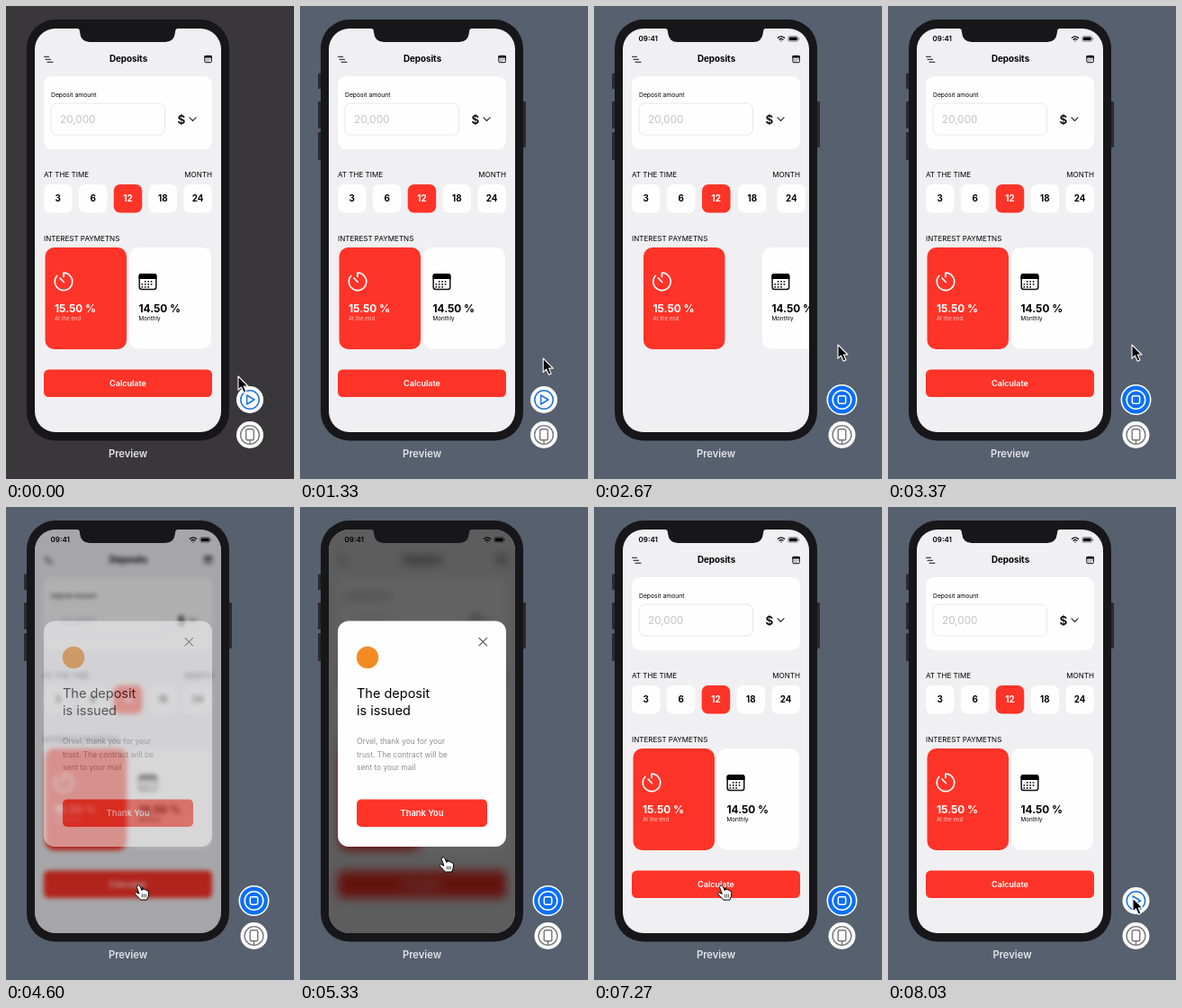
An HTML page for the animation above (8.06 s loop, 320 px wide and 525 px high).

```html
<!DOCTYPE html>
<html lang="en">
<head>
<meta charset="utf-8">
<title>Deposits preview</title>
<style>
  html, body { margin: 0; width: 100%; height: 100%; overflow: hidden; background: #393739; }
  svg { display: block; width: 320px; height: 525px; font-family: Inter, "Liberation Sans", sans-serif; }
  .line { fill: none; stroke-linecap: round; stroke-linejoin: round; }
  .mid { text-anchor: middle; }
  .semi { font-weight: 600; }
  .bold { font-weight: 700; }
</style>
</head>
<body>
<svg viewBox="0 0 320 525">
  <defs>
    <clipPath id="screenClip"><rect x="32" y="25" width="207" height="448" rx="23"/></clipPath>
  </defs>
  <rect id="bg" width="320" height="525"/>

  <g id="sideButtons" fill="#292b31">
    <rect x="20" y="74.5" width="5" height="17.5" rx="1"/>
    <rect x="20" y="106" width="5" height="30" rx="1"/>
    <rect x="20" y="140" width="5" height="31" rx="1"/>
    <rect x="246" y="106" width="5" height="51" rx="1"/>
  </g>
  <rect x="23" y="15" width="225" height="467.5" rx="32" fill="#171619"/>

  <g clip-path="url(#screenClip)">
    <rect x="32" y="25" width="207" height="448" fill="#f0eff2"/>
    <g id="content">
      <g id="header">
        <path class="line" stroke="#111" stroke-width="1.1" d="M42.5 56.3h5M44 59.3h5.5M46 62.3h6"/>
        <text class="mid bold" x="136" y="62" font-size="9.8">Deposits</text>
        <rect x="220.8" y="55.3" width="7.6" height="7.4" rx="1.4" fill="none" stroke="#111"/>
        <path d="M220.5 55h8.2v2.6h-8.2z"/>
        <path stroke="#333" stroke-width=".9" stroke-dasharray="1 1" d="M222.3 59.2h5M222.3 61h4"/>
      </g>
      <g id="amount">
        <rect x="42" y="78" width="187" height="81" rx="9" fill="#fefeff"/>
        <text x="50" y="101" font-size="6.8">Deposit amount</text>
        <rect x="50" y="108" width="126.5" height="35" rx="6.5" fill="#fefeff" stroke="#e7e6ea"/>
        <text x="60" y="130" font-size="11.7" fill="#c3c2c7">20,000</text>
        <text x="190.5" y="130.7" font-size="13.5" class="semi">$</text>
        <path class="line" stroke="#222" stroke-width="1.2" d="M204 123.8l3.5 3.6 3.5-3.6"/>
      </g>
      <g id="timeLabels" font-size="8.05">
        <text x="42" y="190.2">AT THE TIME</text>
        <text x="229" y="190.2" text-anchor="end">MONTH</text>
      </g>
      <g id="tiles"></g>
      <text id="interest" x="42" y="260.5" font-size="8.05">INTEREST PAYMETNS</text>
      <g id="cardEnd">
        <rect x="43.5" y="268" width="90.5" height="113" rx="10" fill="#ff3428"/>
        <g class="line" stroke="#fff" stroke-width="1.7">
          <path d="M64 300.5v-4.3A9.7 9.7 0 1 1 56.7 299.5"/>
          <path d="M60 302l4.3 4.5"/>
        </g>
        <text x="54" y="340" font-size="11.8" class="bold" fill="#fff">15.50 %</text>
        <text x="54" y="348.7" font-size="6" fill="#ffc5c0">At the end</text>
      </g>
      <g id="cardMonth">
        <rect x="137" y="268" width="91" height="112.5" rx="10" fill="#fefeff"/>
        <rect x="148.2" y="297.7" width="18.6" height="16.8" rx="2.5" fill="none" stroke="#111" stroke-width="1.5"/>
        <path d="M147.5 303v-3.2q0-2.8 2.8-2.8h14.4q2.8 0 2.8 2.8v3.2z"/>
        <path stroke="#222" stroke-width="1.6" stroke-dasharray="1.7 1.7" d="M153.9 305.9h10M150.5 308.9h13.5M150.5 311.9h10"/>
        <text x="147.5" y="340" font-size="11.8" class="bold">14.50 %</text>
        <text x="147.5" y="348.7" font-size="6.3">Monthly</text>
      </g>
      <g id="calculate">
        <rect x="42" y="403.5" width="187" height="30.5" rx="5.5" fill="#ff3428"/>
        <text class="mid semi" x="135.5" y="422" font-size="9" fill="#fff">Calculate</text>
      </g>
    </g>

    <rect id="dim" x="32" y="25" width="207" height="448"/>
    <g id="modal">
      <rect x="42" y="126.5" width="187" height="250.5" rx="12" fill="#fefeff"/>
      <path class="line" stroke="#555" stroke-width="1.2" d="M199 145.3l8.6 8.6M207.6 145.3l-8.6 8.6"/>
      <circle cx="75" cy="167" r="12.2" fill="#f48b22"/>
      <g font-size="14.5">
        <text x="63" y="211.5">The deposit</text>
        <text x="63" y="230.5">is issued</text>
      </g>
      <g font-size="8.4" fill="#8d8c91">
        <text x="63" y="263">Orvel, thank you for your</text>
        <text x="63" y="277.7">trust. The contract will be</text>
        <text x="63" y="292.4">sent to your mail</text>
      </g>
      <rect x="63" y="324.5" width="145" height="30.5" rx="5" fill="#ff3428"/>
      <text class="mid semi" x="135.5" y="343.3" font-size="9.4" fill="#fff">Thank You</text>
    </g>
    <g id="status">
      <text x="49.5" y="39.3" font-size="8" class="semi">09:41</text>
      <g class="line" stroke="#000" stroke-width="1.3">
        <path d="M204.4 35.3q3.6-3 7.2 0M206 37.2q2-1.5 4 0"/>
        <path d="M208 38.8v.1"/>
      </g>
      <rect x="215.7" y="33.5" width="11" height="5.8" rx="1.7" fill="none" stroke="#000" stroke-opacity=".5" stroke-width=".7"/>
      <rect x="216.7" y="34.5" width="9" height="3.8" rx=".9"/>
      <path d="M227.7 35.3v2.2" stroke="#000" stroke-opacity=".5"/>
    </g>
  </g>
  <path d="M79 24v1q3 0 3 4q1 11 11 11h84q10 0 11-11q0-4 3-4v-1z" fill="#171619"/>

  <text id="label" class="mid semi" y="501" font-size="11.2" fill="#e4e5e9">Preview</text>

  <g id="dock">
    <g id="play">
      <circle cy="437" r="15" fill="#fff"/>
      <g class="line" stroke="#1c72e4" stroke-width="1.5">
        <circle cy="437" r="10.2"/>
        <path d="M-3.3 432v10l8.2-5z"/>
      </g>
    </g>
    <g id="stop">
      <circle cy="437" r="17" fill="#fff"/>
      <circle cy="437" r="15.4" fill="#0b6ffa"/>
      <g fill="none" stroke="#fff" stroke-width="1.6">
        <circle cy="437" r="10.3"/>
        <rect x="-4.2" y="432.8" width="8.4" height="8.4" rx="1.6"/>
      </g>
    </g>
    <circle cy="476" r="15" fill="#fff"/>
    <g class="line" stroke="#77777c" stroke-width="1.4">
      <circle cy="476" r="10.4"/>
      <rect x="-4.3" y="469.8" width="8.6" height="12" rx="1.4"/>
      <path d="M0 482v4"/>
    </g>
  </g>

  <g id="cursor" stroke-linejoin="round">
    <path id="arrow" fill="#000" stroke="#fff" stroke-width="1.1"
      d="M0 0V15.2L3.5 12L6.2 18.2L9 17L6.3 11H11Z"/>
    <g id="hand">
      <path fill="#fff" stroke="#000" stroke-width="1"
        d="M-1 0.4Q.8-1 1.8.8L4 5.6Q5-.2+5 4.3Q7 3.4 7.4 5Q9.4 4.2 9.8 6Q11.6 5.6 11.6 8L11 12.5L9.5 16H2.5L-3 10.2Q-4.5 8.2-2.7 7.5L1 9.2L-1.6 2.4Q-2 1-1 .4Z"/>
      <path d="M4.3 9.5v4M6.3 9.5v4M8.3 9.5v4" stroke="#000" stroke-width=".7"/>
    </g>
  </g>
</svg>

<script>
const LOOP = 8060, LIVE = 1350, STOPPED = 8000;
const el = {};
document.querySelectorAll('[id]').forEach(n => el[n.id] = n);

el.tiles.innerHTML = [3, 6, 12, 18, 24].map((months, i) => {
  const x = 42 + i * 38.85, on = months === 12;
  return `<g><rect x="${x}" y="198" width="31.5" height="31.5" rx="7" fill="${on ? '#ff3428' : '#fefeff'}"/>
    <text class="mid bold" x="${x + 15.75}" y="217.4" font-size="9.8" fill="${on ? '#fff' : '#000'}">${months}</text></g>`;
}).join('');
const tiles = [...el.tiles.children];
const tileStarts = [1710, 1858, 1980, 2110, 2240];

// time, x, y of the pointer tip
const path = [
  [0, 258, 411], [40, 258, 411], [380, 268, 433], [1000, 268, 433], [1500, 271, 376],
  [3380, 271, 376], [4050, 147, 420], [5070, 147, 420], [5330, 159, 389],
  [5800, 137, 343], [6800, 137, 343], [7000, 137, 420], [7250, 137, 420],
  [7430, 252, 424], [7560, 252, 424], [7700, 272, 434], [LOOP, 272, 434]
];

const clamp = v => Math.min(1, Math.max(0, v));
const ease = v => v * v * (3 - 2 * v);
const ramp = (t, from, to) => ease(clamp((t - from) / (to - from)));
const mix = (a, b, p) => a + (b - a) * p;
const alpha = (node, v) => node.setAttribute('opacity', v);
const show = (node, on) => node.style.display = on ? '' : 'none';
const move = (node, x, y = 0) => node.setAttribute('transform', `translate(${x} ${y})`);

// Critically damped slide from the right
function slideIn(node, t, start, live) {
  const s = Math.max(0, t - start) / 80;
  move(node, live ? 210 * (1 + s) * Math.exp(-s) : 0);
}

function pointer(t) {
  const i = path.findIndex(p => p[0] > t);
  const [t0, x0, y0] = path[i - 1], [t1, x1, y1] = path[i];
  const p = ramp(t, t0, t1);
  move(el.cursor, mix(x0, x1, p), mix(y0, y1, p));
  const onButton = t > 3850 && t < 7390;
  show(el.hand, onButton);
  show(el.arrow, !onButton);
}

function draw(t) {
  const live = t >= LIVE, running = live && t < STOPPED;
  const wake = ramp(t, 430, 830);
  const rgb = [[57, 86], [55, 96], [57, 110]].map(([a, b]) => Math.round(mix(a, b, wake)));
  el.bg.setAttribute('fill', `rgb(${rgb})`);
  alpha(el.sideButtons, wake);

  show(el.status, live);
  show(el.stop, running);
  show(el.play, !running);
  move(el.dock, live ? 275.5 : 271);
  el.label.setAttribute('x', t >= STOPPED ? 138 : 135.5);

  const fade = (node, from) => alpha(node, live ? ramp(t, from, from + 300) : 1);
  fade(el.header, 1450);
  fade(el.timeLabels, 1640);
  fade(el.interest, 1975);
  fade(el.calculate, 2700);
  slideIn(el.amount, t, 1480, live);
  tiles.forEach((tile, i) => slideIn(tile, t, tileStarts[i], live));
  slideIn(el.cardEnd, t, 2300, live);
  slideIn(el.cardMonth, t, 2450, live);

  const opened = ramp(t, 4270, 4930);
  const cover = opened * (1 - ramp(t, 5940, 6190));
  const blur = 5.5 * opened * (1 - ramp(t, 5940, 6290));
  alpha(el.modal, cover);
  alpha(el.dim, cover * 0.61);
  el.content.style.filter = blur > 0.02 ? `blur(${blur}px)` : 'none';

  pointer(t);
}

const begin = performance.now();
function tick() {
  draw((performance.now() - begin) % LOOP);
  requestAnimationFrame(tick);
}
draw(0);
requestAnimationFrame(tick);
</script>
</body>
</html>
```
